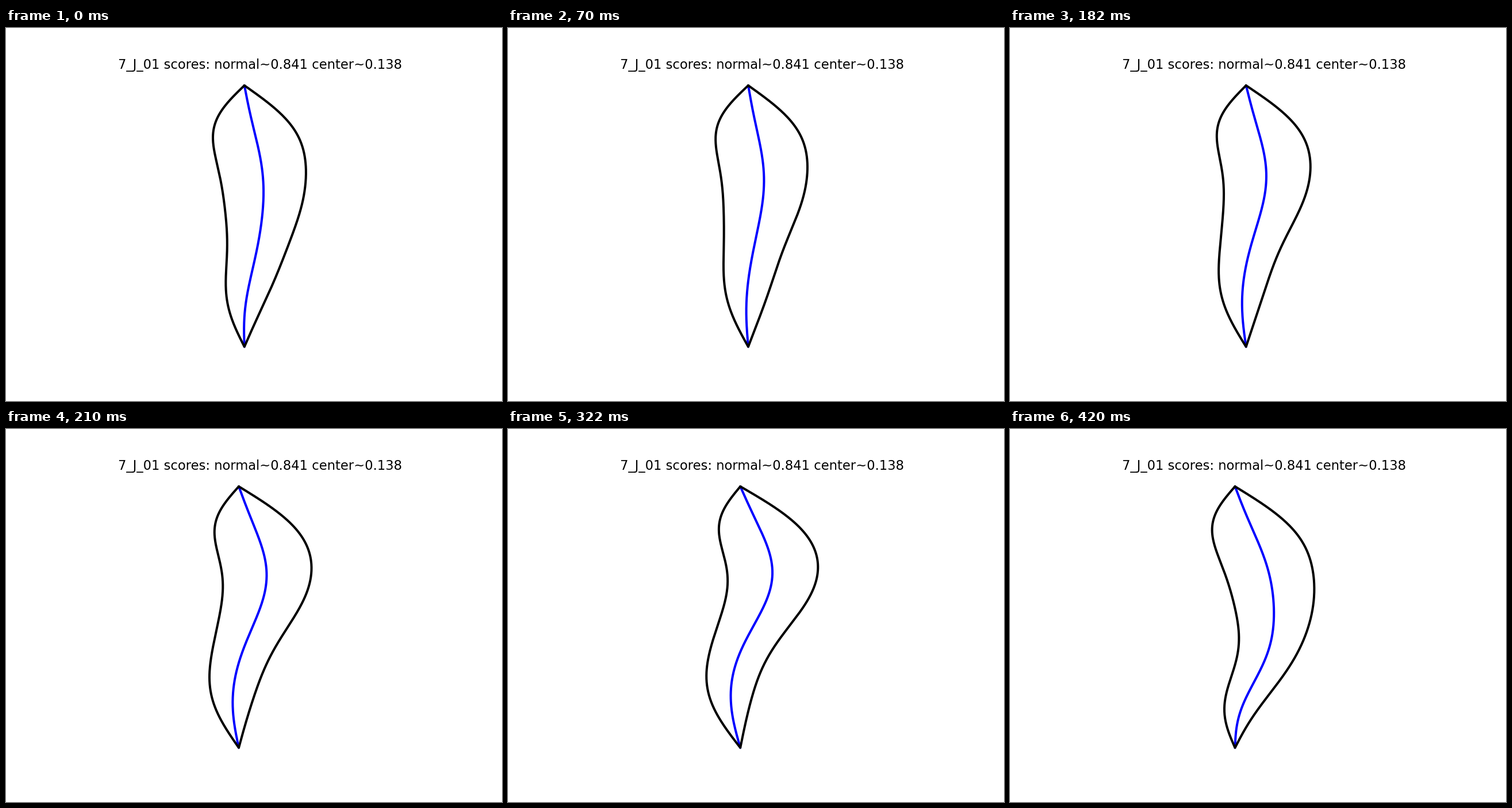
These frames come from a looping animation (863 by 649 pixels, 0.49 s). A matplotlib script:

```python
import numpy as np
import matplotlib.pyplot as plt
from matplotlib.animation import FuncAnimation

W, H, DPI = 863, 649, 64
PX = 72 / DPI  # points per pixel
TOP, BOTTOM = 100, 554.6
TITLE = "7_J_01 scores: normal~0.841 center~0.138"

# Per pose: x of the two tips, C-bend and S-bend of the midline in pixels
TIP = [414.8, 418, 410.7, 405, 404.2, 381, 391.5]
BEND = [27.7, 18.4, 21, 27.8, 28, 68.2, 62]
SWING = [7.9, 11.3, 17.4, 25.2, 32.6, 17.3, 7.1]

u = np.linspace(0, 1, 240)
y = TOP + (BOTTOM - TOP) * u


def sines(*amps):
    """Sine series that is zero at both tips."""
    return sum(a * np.sin(k * np.pi * u) for k, a in enumerate(amps, 1))


half = sines(74.7, 18.9, 12.8, 3.2, 2.2, 0.8)


def body(tip, bend, swing):
    """Midline and half width; the higher waves follow from the two bends."""
    mid = tip + sines(bend, swing, -1.3 - 0.1 * bend,
                      0.07 * bend - 0.13 * swing - 0.8, -0.03 * bend)
    return mid, half * (0.965 + 0.0005 * bend + 0.0015 * swing)


fig = plt.figure(figsize=(W / DPI, H / DPI), dpi=DPI, facecolor="white")
ax = fig.add_axes([0, 0, 1, 1])
ax.set(xlim=(0, W), ylim=(H, 0))
ax.axis("off")

ax.text(442.4, 71.3, TITLE, family="DejaVu Sans", size=22.6 * PX,
        color="black", ha="center", va="baseline")
style = dict(lw=4 * PX, solid_joinstyle="round", solid_capstyle="round")
midline, = ax.plot([], [], color="blue", **style)
outline, = ax.plot([], [], color="black", **style)


def update(i):
    mid, side = body(TIP[i], BEND[i], SWING[i])
    midline.set_data(mid, y)
    outline.set_data(np.r_[mid - side, (mid + side)[::-1]], np.r_[y, y[::-1]])
    return midline, outline


anim = FuncAnimation(fig, update, frames=len(TIP), interval=70,
                     repeat=True, repeat_delay=0)
plt.show()
```
